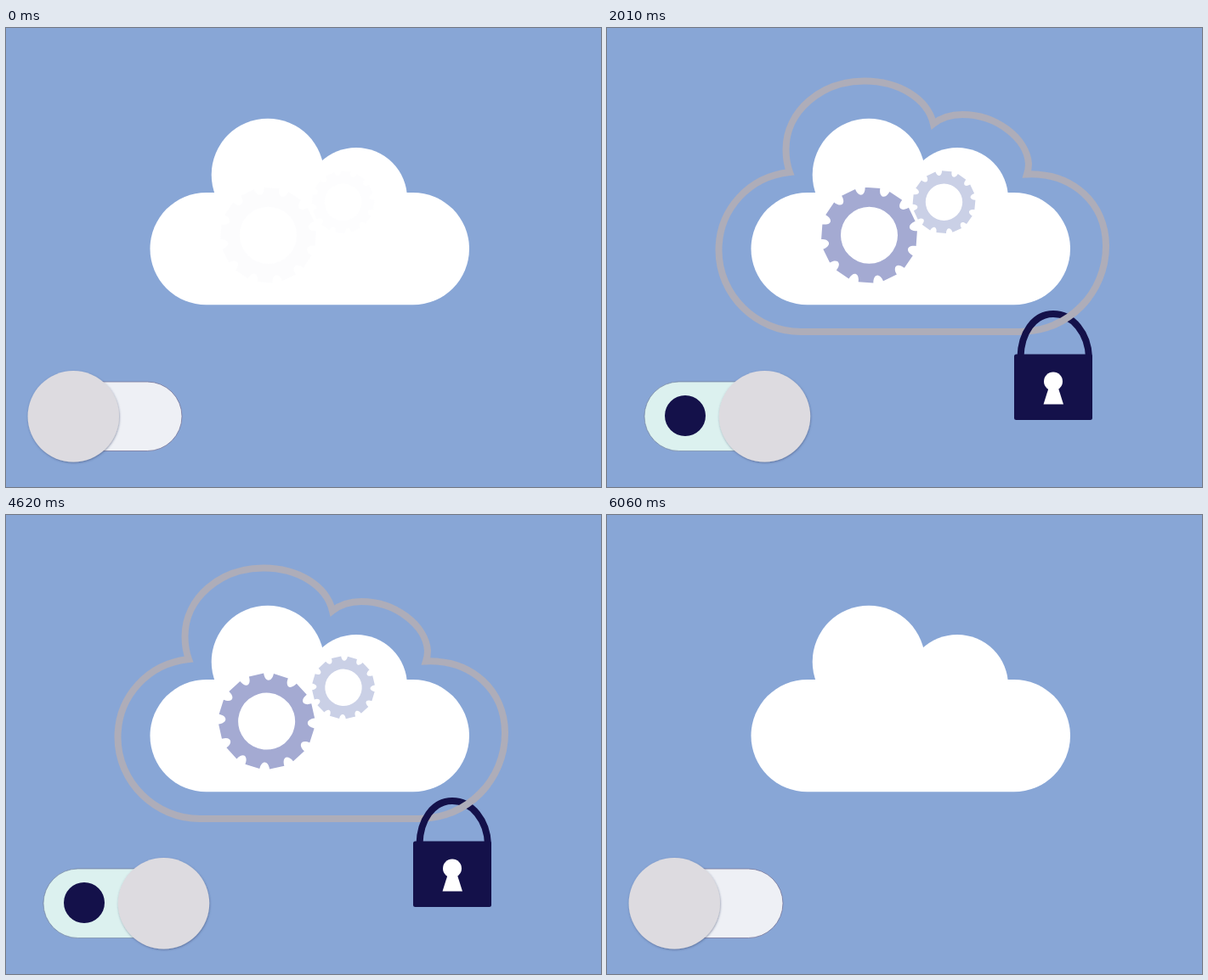
Animation, 700 px wide and 541 px high, one loop 6150 ms. Source, as an HTML page:

```html
<!DOCTYPE html>
<html lang="en">
<head>
<meta charset="utf-8">
<title>Cloud lock toggle</title>
<style>
  html, body { margin: 0; width: 100%; height: 100%; overflow: hidden; background: #88a6d6; }
  svg { display: block; width: 100%; height: 100%; }
</style>
</head>
<body>
<svg viewBox="0 0 700 541">
  <defs>
    <clipPath id="front"><rect x="525" y="320" width="80" height="60"/></clipPath>
    <path id="ring" d="M215 170C211 159 210.500 151 210.500 143C210.500 98 252 62.500 303 62.500
      C343 62.500 377 83 384 113C394 105 405 102 418 102C458 102 494 130 496 160Q496 166 494 172.500
      C548 170 587 207 587 257C587 312 543 358 486 358H228C176 358 131.500 315 131.500 262
      C131.500 214 167 175 215 170Z" fill="none" stroke="#aeadb9" stroke-width="8"/>
    <filter id="shadow" x="-10%" y="-10%" width="120%" height="120%">
      <feDropShadow dx="0.500" dy="1" stdDeviation="0.800" flood-color="#333a66" flood-opacity="0.500"/>
    </filter>
  </defs>

  <g fill="#fff">
    <circle cx="308" cy="173" r="66.300"/>
    <circle cx="412" cy="201" r="60"/>
    <rect x="169.500" y="194" width="375.500" height="132.300" rx="66.150"/>
  </g>
  <g id="gears" fill-rule="evenodd">
    <path id="big" fill="#a4aad2"/>
    <path id="small" fill="#cad0e6"/>
  </g>

  <g id="lock">
    <use href="#ring"/>
    <path d="M486.500 388C487 360 502 337 525 337C548 337 566 360 567 388" fill="none" stroke="#14114a" stroke-width="8"/>
    <use href="#ring" clip-path="url(#front)"/>
    <rect x="479" y="384.500" width="92" height="77.500" rx="2.500" fill="#14114a"/>
    <path d="M520 423H530.500L537 443.500H513.500Z" fill="#fff"/>
    <circle cx="525" cy="416.500" r="11" fill="#fff"/>
  </g>

  <rect x="44" y="417" width="163" height="81.500" rx="40.750" fill="#eef0f5" stroke="#77779b" stroke-width="0.800"/>
  <g id="on">
    <rect x="44" y="417" width="163" height="81.500" rx="40.750" fill="#dcf1ef" stroke="#8098b4" stroke-width="0.800"/>
    <circle cx="92" cy="457" r="24" fill="#14114a"/>
  </g>
  <circle id="knob" cx="79.300" cy="457.800" r="53.700" fill="#dddbe0" filter="url(#shadow)"/>
</svg>
<script>
  const LOOP = 6150, STEP = 30, TEETH = 12;
  const el = id => document.getElementById(id);
  const ramp = (t, a, b) => Math.min(1, Math.max(0, (t - a) / (b - a)));

  // Toothed ring around (0, 0) with rounded notches
  function gearPath(outer, hole, phase) {
    const pitch = 360 / TEETH;
    const at = (r, deg) => {
      const a = (deg + phase) * Math.PI / 180;
      return `${(r * Math.cos(a)).toFixed(2)} ${(r * Math.sin(a)).toFixed(2)}`;
    };
    const deep = outer * 0.81;
    let d = "M" + at(outer, -9);
    for (let i = 0; i < TEETH; i++) {
      const a = i * pitch;
      d += `L${at(outer, a + 9)}C${at(deep, a + 10)} ${at(deep, a + 20)} ${at(outer, a + 21)}`;
    }
    return d + `ZM${hole} 0A${hole} ${hole} 0 1 0 ${-hole} 0A${hole} ${hole} 0 1 0 ${hole} 0Z`;
  }

  // Each gear turns about a point slightly off its own centre
  const turn = (id, deg, px, py, dx, dy) =>
    el(id).setAttribute("transform", `translate(${px} ${py}) rotate(${deg}) translate(${dx} ${dy})`);

  // Accelerates briefly, then holds a constant speed
  function gearAngle(t) {
    const s = Math.max(0, t - 1950), warm = 630, speed = 0.0312;
    return speed * (s < warm ? s * s / (2 * warm) : s - warm / 2);
  }

  function draw(time) {
    let t = Math.floor(time % LOOP / STEP) * STEP;
    if (t < 120) t = 0;
    const slide = ramp(t, 1260, 1860) - ramp(t, 5430, 6030);
    const shown = ramp(t, 1260, 1980) - ramp(t, 5430, 6060);
    const angle = gearAngle(t);

    el("gears").setAttribute("opacity", ramp(t, -15, 630) - ramp(t, 5430, 6060));
    turn("big", angle, 308.3, 242.4, 0.2, 1.8);
    turn("small", angle * 2.2, 396.9, 204.3, -0.4, 0.9);
    el("lock").setAttribute("opacity", shown);
    el("on").setAttribute("opacity", shown);
    el("knob").setAttribute("transform", `translate(${106.2 * slide} 0)`);
  }

  el("big").setAttribute("d", gearPath(56.6, 33.5, -86));
  el("small").setAttribute("d", gearPath(37, 21.7, -85));

  const start = performance.now();
  function tick() {
    draw(performance.now() - start);
    requestAnimationFrame(tick);
  }
  tick();
</script>
</body>
</html>
```
